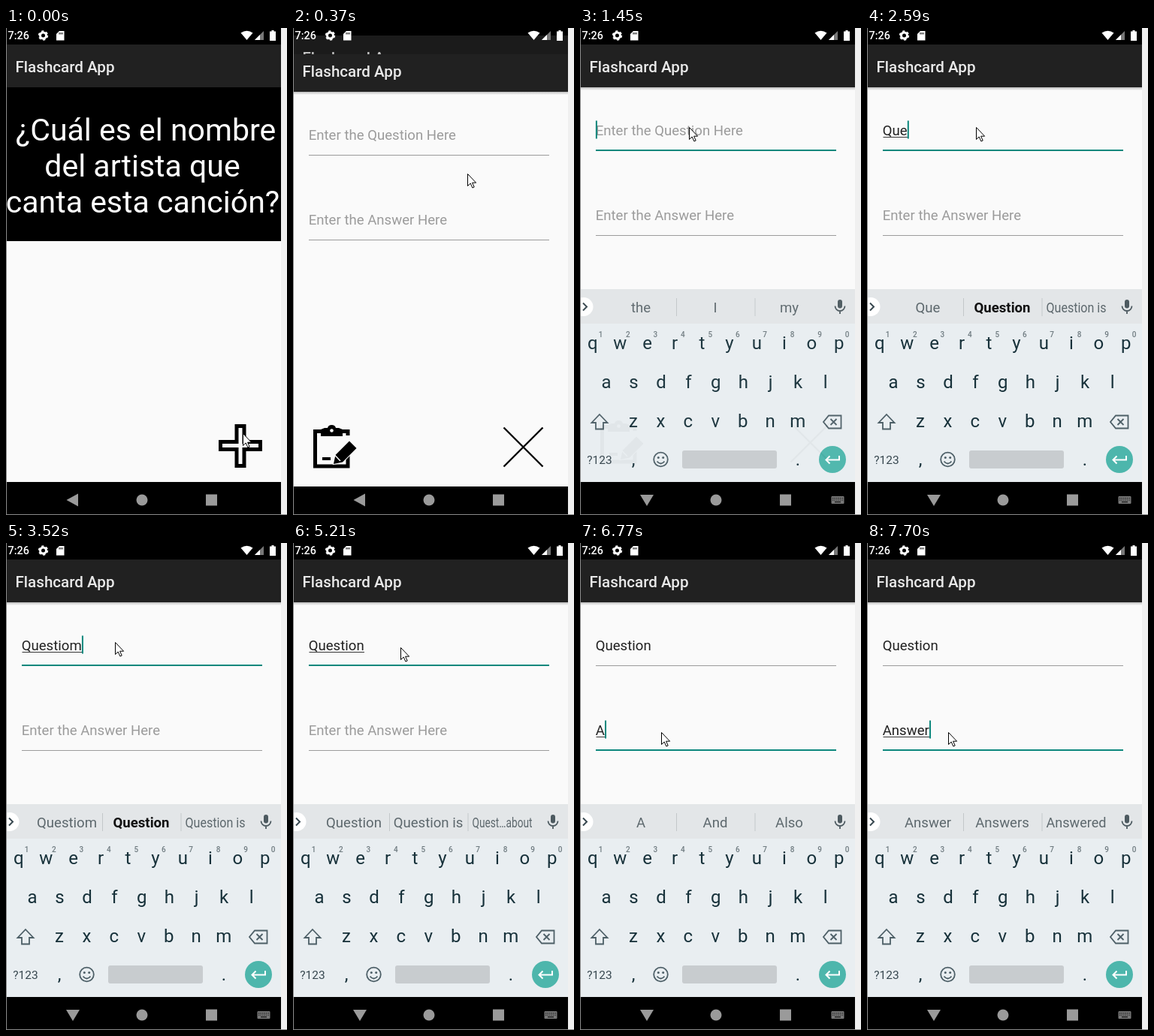
Write an HTML page that moves like this. It is 374 by 649 pixels and loops after 8000 ms.

```html
<!DOCTYPE html>
<html lang="en">
<head>
<meta charset="utf-8">
<title>Flashcard App</title>
<style>
  html, body { margin: 0; width: 100%; height: 100%; overflow: hidden; background: #f0f0f0; }
  svg { display: block; width: 374px; height: 649px; font-family: Roboto, "Noto Sans", sans-serif; }
  text { white-space: pre; }
  .mid { text-anchor: middle; }
  .title { font-size: 20.6px; font-weight: 500; fill: #e9e9e9; }
  .field { font-size: 18.6px; }
  .key { font-size: 24px; fill: #17313a; text-anchor: middle; }
  .sup { font-size: 10px; fill: #6f7b80; font-weight: 500; text-anchor: middle; }
  .sug { font-size: 18.6px; text-anchor: middle; }
</style>
</head>
<body>
<svg viewBox="0 0 374 649" xmlns="http://www.w3.org/2000/svg">
  <defs>
    <linearGradient id="shade" x1="0" y1="0" x2="0" y2="1">
      <stop offset="0" stop-color="#bdbdbd"/><stop offset="1" stop-color="#fafafa"/>
    </linearGradient>
    <clipPath id="phone"><rect x="1" y="0" width="365" height="648"/></clipPath>
    <clipPath id="reveal"><rect id="revealBox" x="1" y="0" width="365" height="649"/></clipPath>
  </defs>
  <rect width="374" height="649" fill="#f0f0f0"/>
  <rect y="0" width="1" height="649" fill="#8a8a8a"/>
  <g clip-path="url(#phone)">
    <rect x="1" width="365" height="648" fill="#000"/>

    <g id="home">
      <rect x="1" y="79" width="365" height="560" fill="#fafafa"/>
      <rect x="1" y="22" width="365" height="57" fill="#212121"/>
      <text class="title" x="12.5" y="59">Flashcard App</text>
      <rect x="1" y="79" width="365" height="205" fill="#000"/>
      <g font-size="41" fill="#fff" class="mid">
        <text x="186" y="150">¿Cuál es el nombre</text>
        <text x="181.5" y="198">del artista que</text>
        <text x="182" y="246">canta esta canción?</text>
      </g>
      <path d="M307 530.5h10v21h21.5v10h-21.5v22h-10v-22h-21.500v-10h21.500z" fill="#fafafa" stroke="#000" stroke-width="5"/>
      <rect id="dim" x="1" y="22" width="365" height="600" opacity="0"/>
    </g>
    <rect x="1" y="605" width="365" height="43" fill="#000"/>

    <g clip-path="url(#reveal)"><g id="form">
      <rect x="1" width="365" height="22" fill="#000"/>
      <rect x="1" y="79" width="365" height="526" fill="#fafafa"/>
      <rect x="1" y="79" width="365" height="4" fill="url(#shade)"/>
      <rect x="1" y="22" width="365" height="57" fill="#212121"/>
      <text class="title" x="12.5" y="59">Flashcard App</text>
      <g id="fields"></g>
      <path d="M280.500 526.500l52 52M332.500 526.500l-52 52" stroke="#000" stroke-width="2.4"/>
      <g>
        <path d="M73 537v-5.500h-43.500v46.500h43.500v-15" fill="none" stroke="#000" stroke-width="5"/>
        <path d="M37 538v-9l5-2h4q1-4 5.500-4t5.500 4h4l5 2v9z"/>
        <circle cx="51.500" cy="530.500" r="2.300" fill="#fafafa"/>
        <path d="M54 575l2.500-12 18.500-18.500 9.500 9.500-18.500 18.500z" stroke="#fafafa" stroke-width="2" paint-order="stroke"/>
        <path d="M54.500 562l8.500 9" stroke="#fafafa" stroke-width="1.500"/>
        <rect x="39" y="566" width="11" height="4"/>
      </g>
    </g></g>

    <g id="board">
      <rect x="1" y="348" width="365" height="257" fill="#e9eef1"/>
      <rect x="1" y="348" width="365" height="46" fill="#e3e6e8"/>
      <path d="M128.500 360v24M233 360v24" stroke="#c3c8ca"/>
      <circle cx="5" cy="371.500" r="12.500" fill="#fff"/>
      <path d="M4 366.500l5 5-5 5" fill="none" stroke="#37474f" stroke-width="2"/>
      <rect x="343" y="362" width="6" height="11.500" rx="3" fill="#4d5a60"/>
      <path d="M339.500 370.500a6.500 6.500 0 0 0 13 0M346 377v4" fill="none" stroke="#4d5a60" stroke-width="1.800"/>
      <g id="words"></g>
      <g id="keys"></g>
      <g fill="none" stroke="#4d5f67" stroke-width="1.800">
        <path d="M26 515l10.500 11h-5.500v8.500h-10v-8.500h-5.500z"/>
        <path d="M331 516.500h16.500v17h-16.500l-7-8.500z"/>
        <path d="M333.500 521l8 8M341.500 521l-8 8"/>
        <circle cx="107.500" cy="575" r="9.300"/>
        <path d="M102.500 577.500q5 6 10 0"/>
      </g>
      <g fill="#4d5f67"><circle cx="104.300" cy="572.500" r="1.500"/><circle cx="110.700" cy="572.500" r="1.500"/></g>
      <text class="mid" x="26" y="580.500" font-size="15.500" fill="#37474f">?123</text>
      <rect x="136" y="563" width="126" height="24" rx="3" fill="#c8cccf"/>
      <circle cx="336" cy="575" r="18" fill="#4db6ac"/>
      <path d="M345 570v5.500h-17M332.500 570.500l-5 5 5 5" fill="none" stroke="#fff" stroke-width="2"/>
    </g>

    <g fill="#fff">
      <text x="2.500" y="15" font-size="14.400" font-weight="500">7:26</text>
      <circle cx="49.500" cy="10" r="4" fill="none" stroke="#fff" stroke-width="3"/>
      <circle cx="49.500" cy="10" r="5.700" fill="none" stroke="#fff" stroke-width="2" stroke-dasharray="3 2.970"/>
      <path d="M71 4h6.500v12.500h-10.500v-8.500z"/>
      <path d="M71 6v2.500M73 6v2.500M75 6v2.500" stroke="#000"/>
      <path d="M312.500 6.500q8-5.500 16 0l-8 9.500z"/>
      <path d="M343 4v12h-12z" fill="#777"/><path d="M338 9v7h-7z"/>
      <path d="M351 4.500h2.500v-1.500h3v1.500h2.500v12.500h-8z"/>
    </g>
    <g fill="#9a9a9a">
      <path id="back"/>
      <circle cx="181" cy="629" r="7.500"/>
      <rect x="266" y="621.500" width="15" height="15"/>
      <g id="ime">
        <rect x="334.500" y="624" width="17" height="10" rx="1" fill="#777"/>
        <path d="M336 626.500h14M336 629h14" stroke="#000" stroke-dasharray="1.300 1.300"/>
        <path d="M339 631.700h8" stroke="#000"/>
      </g>
    </g>
  </g>
  <rect y="648" width="374" height="1" fill="#8a8a8a"/>
  <path id="mouse" d="M.5 .5v16l3.700-3.500 2.700 6 2.300-1-2.600-5.800h5z" fill="#fff" stroke="#000"/>
</svg>
<script>
const LOOP = 8000, TEAL = '#0b877c';
const $ = id => document.getElementById(id);

function add(parent, tag, attrs, text) {
  const el = document.createElementNS('http://www.w3.org/2000/svg', tag);
  set(el, attrs);
  if (text !== undefined) el.textContent = text;
  return parent.appendChild(el);
}
function set(el, attrs) {
  for (const k in attrs) el.setAttribute(k, attrs[k]);
}
const show = (el, on) => el.setAttribute('visibility', on ? 'visible' : 'hidden');

// Steps: [time, value...]; the last one already begun is in force.
function at(steps, t) {
  let now = steps[0];
  for (const s of steps) if (s[0] <= t) now = s;
  return now;
}

const mousePath = [
  [0, 315, 540], [250, 270, 350], [370, 232, 194], [520, 190, 165], [640, 158, 141],
  [770, 145, 132], [4140, 143, 139], [5330, 143, 149], [5480, 136, 205],
  [5610, 130, 252], [5760, 108, 252]
];
// new screen offset, reveal top, old screen offset, dim
const slide = [
  [0, 0, 649, 0, 0], [250, 23, 480, -4, 0.05], [370, 6, 35, -12, 0.17],
  [520, 2, 12, -12, 0.2], [640, 0, 0, 0, 0]
];
const question = [
  [0, ''], [2160, 'Q'], [2440, 'Qu'], [2590, 'Que'], [2710, 'Ques'], [2830, 'Quest'],
  [3110, 'Questi'], [3370, 'Questio'], [3520, 'Questiom'], [4570, 'Questio'], [4810, 'Question']
];
const answer = [
  [0, ''], [6770, 'A'], [7020, 'Ans'], [7270, 'Answe'], [7580, 'Answer']
];
const fix = ['Question', 'Question is'];
const suggestions = [
  [0, 'the', 'I', 'my'], [2160, 'Q', ...fix], [2590, 'Que', ...fix], [2710, 'Ques', ...fix],
  [2830, 'Quest', ...fix], [3230, 'Questi', ...fix], [3370, 'Questio', ...fix],
  [3520, 'Questiom', ...fix], [4570, 'Questio', ...fix],
  [4810, 'Question', 'Question is', 'Quest…about'], [6150, 'the', 'I', 'my'],
  [6770, 'A', 'And', 'Also'], [7020, 'Ans', 'And', 'Ask'],
  [7270, 'Answe', 'Answer', 'Answers'], [7700, 'Answer', 'Answers', 'Answered']
];
const caret = [
  [0, 0], [1180, 1], [1720, 0], [2160, 1], [4020, 0], [4570, 1],
  [5210, 0], [5880, 1], [6520, 0], [6770, 1]
];
// focus strength of the two fields
const focus = [[0, 0, 0], [920, 0.5, 0], [1040, 1, 0], [5760, 0, 0.5], [5880, 0, 1]];

function makeField(y, hint) {
  const g = add($('fields'), 'g', { transform: `translate(0 ${y})` });
  return {
    hint,
    text: add(g, 'text', { class: 'field', x: 20.7, y: 20 }),
    under: add(g, 'rect', { x: 21.5, y: 22, height: 1, fill: '#333' }),
    line: add(g, 'rect', { x: 21, y: 40, width: 320, height: 1, fill: '#9b9b9b' }),
    glow: add(g, 'rect', { x: 21, y: 39, width: 320, height: 2, fill: TEAL }),
    caret: add(g, 'rect', { y: 0.5, width: 2, height: 24, fill: TEAL })
  };
}
const fields = [makeField(123, 'Enter the Question Here'), makeField(236, 'Enter the Answer Here')];

function drawField(f, value, strength, blink) {
  const label = value || f.hint;
  if (f.text.textContent !== label) f.text.textContent = label;
  f.text.setAttribute('fill', value ? '#212121' : '#9b9b9b');
  const w = value ? f.text.getComputedTextLength() : 0;
  f.under.setAttribute('width', Math.max(0, w - 0.5));
  show(f.under, value && strength);
  f.glow.setAttribute('opacity', strength);
  f.caret.setAttribute('x', 20.9 + w);
  show(f.caret, strength === 1 && blink);
}

const words = [[81, 84], [180, 96], [278.5, 80]].map(([x, room]) =>
  ({ x, room, el: add($('words'), 'text', { class: 'sug' }) }));

function drawWords(list, bold) {
  words.forEach((w, i) => {
    const strong = bold && i === 1;
    w.el.textContent = list[i];
    set(w.el, { 'font-weight': strong ? 700 : 400, fill: strong ? '#111' : '#5d686d' });
    // long words are condensed, at most to 70 %
    const k = Math.max(0.7, Math.min(1, w.room / w.el.getComputedTextLength()));
    w.el.setAttribute('transform', `translate(${w.x} 379) scale(${k} 1)`);
  });
}

[['qwertyuiop', 16.7, 428], ['asdfghjkl', 35, 480], ['zxcvbnm', 71, 531.5]].forEach(([row, x, y], r) =>
  [...row].forEach((c, i) => {
    const cx = x + i * 36.45;
    add($('keys'), 'text', { class: 'key', x: cx, y }, c);
    if (!r) add($('keys'), 'text', { class: 'sup', x: cx + 10.8, y: 411.5 }, (i + 1) % 10);
  }));
add($('keys'), 'text', { class: 'key', x: 71, y: 583 }, ',');
add($('keys'), 'text', { class: 'key', x: 290, y: 583 }, '.');

let lastWords;
function draw(t) {
  const [, mx, my] = at(mousePath, t);
  $('mouse').setAttribute('transform', `translate(${mx} ${my})`);

  const [, enter, top, leave, dim] = at(slide, t);
  $('form').setAttribute('transform', `translate(0 ${enter})`);
  $('revealBox').setAttribute('y', top);
  $('home').setAttribute('transform', `translate(0 ${leave})`);
  $('dim').setAttribute('opacity', dim);
  show($('home'), t < 640);

  const f = at(focus, t), blink = at(caret, t)[1];
  drawField(fields[0], at(question, t)[1], f[1], blink);
  drawField(fields[1], at(answer, t)[1], f[2], blink);

  const list = at(suggestions, t);
  if (list !== lastWords) {
    drawWords(list.slice(1), list[2] === fix[0]);
    lastWords = list;
  }
  $('board').setAttribute('opacity', t < 1450 ? 0 : t < 1570 ? 0.97 : 1);
  const typing = t >= 1180;
  $('back').setAttribute('d', typing ? 'M80 622h18l-9 15z' : 'M96 620.500v17l-15.500-8.500z');
  show($('ime'), typing);
}

const start = performance.now();
function tick() {
  draw((performance.now() - start) % LOOP);
  requestAnimationFrame(tick);
}
tick();
</script>
</body>
</html>
```
